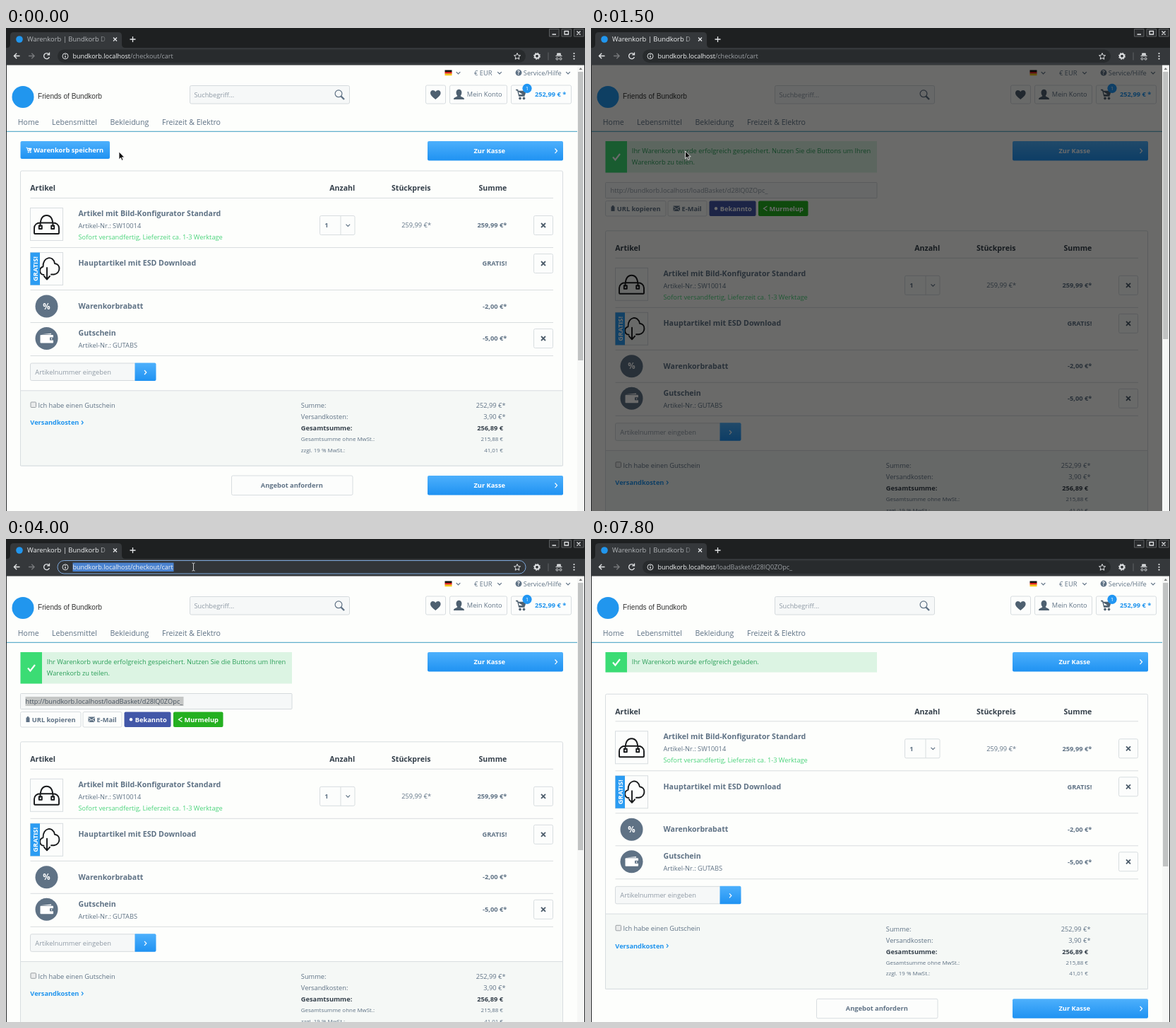
Animation, 820 px wide and 683 px high, one loop 7.9 s. Source, as an HTML page:

```html
<!DOCTYPE html>
<html lang="de">
<head>
<meta charset="utf-8">
<title>Warenkorb</title>
<style>
html, body { margin: 0; width: 100%; height: 100%; overflow: hidden; background: #1e2021; }
svg { display: block; width: 820px; height: 683px; }
text { font: 9.27px "Open Sans", sans-serif; fill: #5f7285; white-space: pre; }
.b { font-weight: 700; }
.big { font-size: 10.59px; }
.small { font-size: 7.95px; }
.dark { fill: #35404b; }
.w { fill: #fff; }
.blue { fill: #1f94ee; }
.ph { fill: #8f9aa5; }
.end { text-anchor: end; }
.mid { text-anchor: middle; }
.ok { fill: #2b9f59; }
.ui text { font-size: 9.03px; fill: #9fa3a7; }
.ui .w { fill: #f1f3f4; }
.ui .hit { font-size: 8.85px; font-weight: 700; }
.box { fill: #fcfdfc; stroke: #d8dde0; }
.field { fill: #f6f8f8; stroke: #d5dadd; }
.rule { stroke: #d9dddf; fill: none; }
.ln { fill: none; stroke: #5f7285; stroke-width: 1.2; }
.lt { fill: none; stroke: #e3e5e7; stroke-width: 1.3; }
.ink { fill: none; stroke: #17191b; stroke-width: 1.9; stroke-linejoin: round; stroke-linecap: round; }
.wl { fill: none; stroke: #fff; stroke-width: 1.2; }
</style>
</head>
<body>
<svg viewBox="0 0 820 683">
<defs>
  <linearGradient id="btn" x2="0" y2="1"><stop stop-color="#4db0fc"/><stop offset="1" stop-color="#1f92f2"/></linearGradient>
  <linearGradient id="fade"><stop stop-color="#35383b" stop-opacity="0"/><stop offset="1" stop-color="#35383b"/></linearGradient>
  <linearGradient id="shade" x2="0" y2="1"><stop stop-opacity=".4"/><stop offset="1" stop-opacity="0"/></linearGradient>
  <path id="chev" class="ln" d="M-2.8-1.4 0 1.4 2.8-1.4"/>
  <g id="del">
    <rect class="box" x="-13.5" y="-13.5" width="27" height="27" rx="2"/>
    <path d="M-3-3 3 3M3-3-3 3" stroke="#4a5a69" stroke-width="1.8"/>
  </g>
  <g id="pay">
    <rect width="192" height="27.5" rx="2" fill="url(#btn)"/>
    <text class="b w" x="65.5" y="17">Zur Kasse</text>
    <path class="wl" d="M180.5 10.5l3 3.3-3 3.3"/>
  </g>
  <g id="trolley">
    <path d="M0 0h2.6l2 8.6h8M3 2h11l-1.6 5.2H4.3z" stroke-width="1.3"/>
    <circle cx="6" cy="12" r="1.4"/><circle cx="11.5" cy="12" r="1.4"/>
  </g>
  <g id="globe">
    <circle r="4.3" fill="#b9bdc0"/>
    <path d="M-3.5-1.5 0-2.5 1 0-1 1 0 3M2-3 3.5 0" fill="none" stroke="#35383b"/>
  </g>
  <path id="tick" d="M-5 0-1.6 4 5-4.5" fill="none" stroke="#fff" stroke-width="2.1"/>
</defs>

<!-- shop page -->
<rect x="1" y="52" width="808" height="631" fill="#fdfefc"/>
<g id="head">
  <path fill="#111" d="M621.5 59.5h10v2.7h-10z"/><path fill="#d8201c" d="M621.5 62h10v2.7h-10z"/><path fill="#f5c518" d="M621.5 64.5h10v2.7h-10z"/>
  <use href="#chev" x="640.5" y="63.5"/><use href="#chev" x="699" y="63.5"/><use href="#chev" x="796" y="63.5"/>
  <text x="663" y="66.8">€ EUR</text>
  <circle cx="726" cy="63.2" r="4.4" fill="#5f7285"/><text class="small b w mid" x="726" y="66">?</text>
  <text x="732.8" y="66.8">Service/Hilfe</text>
  <circle cx="24" cy="97.5" r="15.5" fill="#2196ee"/>
  <text x="45" y="99.8" style="font:10.1px 'Liberation Sans',sans-serif;fill:#333">Friends of Bundkorb</text>
  <rect class="field" x="260.5" y="81.5" width="226" height="25.5" rx="2"/>
  <text class="ph" x="266.5" y="97.5">Suchbegriff...</text>
  <circle cx="471" cy="92.8" r="4.9" class="ln" stroke-width="1.8"/><path class="ln" d="M474.5 96.5l4.5 4.5" style="stroke-width:2.4"/>
  <rect class="box" x="594.5" y="81" width="28" height="26" rx="2"/>
  <path fill="#4e6070" d="M608.3 101c-3-2.6-7.3-5.5-7.3-9.3 0-4.6 5.6-5 7.3-1.4 1.7-3.6 7.3-3.2 7.3 1.4 0 3.800-4.300 6.700-7.300 9.300z"/>
  <rect class="box" x="628.5" y="81" width="81" height="26" rx="2"/>
  <path fill="#4e6070" d="M634 101c0-3.500 4-3 5.300-5-3-4-2-9.300 2.200-9.300s5.200 5.300 2.200 9.300c1.300 2 5.300 1.500 5.300 5z"/>
  <text x="652.8" y="97">Mein Konto</text>
  <rect class="box" x="715.5" y="81" width="85" height="26" rx="2"/>
  <use href="#trolley" x="722" y="87.500" fill="#4e6070" stroke="#4e6070"/>
  <circle cx="738" cy="85.300" r="6.600" fill="#2196f3"/><text class="small w mid" x="738" y="88.200">1</text>
  <text class="b blue" x="749" y="97">252,99 € *</text>
  <text class="big" x="16.800" y="137">Home</text>
  <text class="big" x="65" y="137">Lebensmittel</text>
  <text class="big" x="147.500" y="137">Bekleidung</text>
  <text class="big" x="221" y="137">Freizeit &amp; Elektro</text>
  <path d="M1 146.300h808" stroke="#62b0cc" stroke-width="1.200"/>
</g>

<use href="#pay" x="597" y="160"/>
<g id="save">
  <rect id="saveBg" x="20.500" y="160" width="126.500" height="25" rx="2" fill="url(#btn)"/>
  <use href="#trolley" transform="translate(28.500 169) scale(.55)" fill="#fff" stroke="#fff"/>
  <text class="b w" x="39" y="175.700">Warenkorb speichern</text>
</g>

<g id="saved">
  <path fill="#dcf4e3" d="M20.500 160H405v44.500H20.500z"/><path fill="#3bdc74" d="M20.500 160H51v44.500H20.500z"/>
  <use href="#tick" x="36" y="182.500"/>
  <text class="ok" x="57.800" y="177.300">Ihr Warenkorb wurde erfolgreich gespeichert. Nutzen Sie die Buttons um Ihren</text>
  <text class="ok" x="57.800" y="193.300">Warenkorb zu teilen.</text>
  <rect class="field" x="20.500" y="218.500" width="384.500" height="22" rx="1"/>
  <rect id="linkSel" x="27.500" y="223" width="224" height="13"/>
  <text id="link" x="27.500" y="232.800">http://bundkorb.localhost/loadBasket/d28lQ0ZOpc_</text>
  <g id="copy" fill="#5f7285">
    <rect id="copyBg" class="box" x="20.500" y="244.500" width="85.500" height="21.500" rx="2"/>
    <path d="M28.500 252.500h5v6.500h-5zM29.800 251h2.400v2h-2.400z"/>
    <text class="b" x="36.800" y="258.500" style="fill:inherit">URL kopieren</text>
  </g>
  <rect class="box" x="109" y="244.500" width="55" height="21.500" rx="2"/>
  <path fill="#5f7285" d="M116.500 251.500h9.500v7.500h-9.500z"/><path d="M116.500 252.500l4.700 3.500 4.800-3.500M116.500 259l3-3M126 259l-3-3" fill="none" stroke="#fff"/>
  <text class="b" x="128.500" y="258.500">E-Mail</text>
  <rect x="167.500" y="244.500" width="66" height="21.500" rx="2" fill="#4257a8"/>
  <circle cx="177" cy="255.300" r="2.200" fill="#fff"/>
  <text class="b w" x="182.800" y="258.500">Bekannto</text>
  <rect x="237" y="244.500" width="70.500" height="21.500" rx="2" fill="#24b020"/>
  <path class="wl" d="M249.500 252l-5 3.200 5 3.200"/>
  <text class="b w" x="252.500" y="258.500">Murmelup</text>
</g>

<g id="loaded">
  <path fill="#dcf4e3" d="M20.500 160H405v28.500H20.500z"/><path fill="#3bdc74" d="M20.500 160H51v28.500H20.500z"/>
  <use href="#tick" x="36" y="174.500"/>
  <text class="ok" x="57.800" y="177.300">Ihr Warenkorb wurde erfolgreich geladen.</text>
</g>

<g id="cart">
  <rect x="20.500" y="202" width="768" height="417" rx="2" fill="#fdfefc" stroke="#d8dde0"/>
  <path fill="#f5f8f6" stroke="#d8dde0" d="M20.500 512.800h768V619h-768z"/>
  <path class="rule" d="M34.500 240.500h740.500m-740.500 70h740.500m-740.500 60h740.500m-740.500 46h740.500m-740.500 47h740.500"/>
  <g class="head">
    <text class="big b dark" x="34.300" y="230.300">Artikel</text>
    <text class="big b dark" x="458.300" y="230.300">Anzahl</text>
    <text class="big b dark" x="546" y="230.300">Stückpreis</text>
    <text class="big b dark end" x="709.300" y="230.300">Summe</text>
  </g>
  <rect class="box" x="34.500" y="254.500" width="46" height="46"/>
  <path class="ink" d="M40 290v-7c0-5 4-7.500 8-7.500h19c4 0 8 2.500 8 7.500v7q0 1-1 1H41q-1 0-1-1zM48.500 280c0-10 3-15 9-15s9 5 9 15M46.800 279.500h4v4.500h-4zM64.200 279.500h4v4.500h-4z"/>
  <text class="big b" x="102.500" y="266.200">Artikel mit Bild-Konfigurator Standard</text>
  <text x="102.500" y="282.800">Artikel-Nr.: SW10014</text>
  <text x="102.500" y="298.800" style="fill:#4cd47c">Sofort versandfertig, Lieferzeit ca. 1-3 Werktage</text>
  <rect class="box" x="444.500" y="265.500" width="49.500" height="27" rx="2"/><path class="rule" d="M474 265.500v27"/>
  <text class="b" x="451.300" y="282.300">1</text><use href="#chev" x="484.300" y="279"/>
  <text class="end" x="602" y="282.300">259,99 €*</text>
  <text class="b end" x="709.300" y="282.300">259,99 €*</text>
  <use href="#del" x="761" y="279"/>

  <rect class="box" x="34.500" y="317.500" width="46" height="46"/>
  <path class="ink" d="M53.500 349c-7-1-7-10-1-11.500C52 323 67 321 69 333c9 1 8.500 14-1 15.500h-4M58 339v16m-4-4 4 4.500 4-4.500"/>
  <path fill="#2b9cf2" d="M34.500 317.500h13.500v46H34.500z"/>
  <text class="b w mid" transform="translate(45 340.500) rotate(-90)">GRATIS!</text>
  <text class="big b" x="102.500" y="336.300">Hauptartikel mit ESD Download</text>
  <text class="b end" x="709.300" y="336.300">GRATIS!</text>
  <use href="#del" x="761" y="333"/>

  <circle cx="57.500" cy="393.500" r="16" fill="#5f7285"/>
  <text class="b w mid" x="57.500" y="397.500" style="font-size:11.500px">%</text>
  <text class="big b" x="102.500" y="396.800">Warenkorbrabatt</text>
  <text class="b end" x="709.300" y="396.500">-2,00 €*</text>

  <circle cx="57.500" cy="439" r="16" fill="#5f7285"/>
  <rect x="48.500" y="434" width="18.500" height="11.500" rx="1" fill="#fff"/><path d="M50 433.300l14-1.500v1.500z" fill="#fff"/>
  <rect x="62" y="437.500" width="5.500" height="4" fill="#5f7285"/><circle cx="64.500" cy="439.500" r=".9" fill="#fff"/>
  <text class="big b" x="102.500" y="435">Gutschein</text>
  <text x="102.500" y="451.800">Artikel-Nr.: GUTABS</text>
  <text class="b end" x="709.300" y="442.300">-5,00 €*</text>
  <use href="#del" x="761" y="439"/>

  <rect class="field" x="34.500" y="474" width="149" height="24.500" rx="2"/>
  <text class="ph" x="41.300" y="490">Artikelnummer eingeben</text>
  <path fill="url(#btn)" d="M182.500 473.500h28q2 0 2 2v21.500q0 2-2 2h-28z"/><path class="wl" d="M196 484l2.800 3-2.800 3"/>

  <rect x="35" y="529" width="7.500" height="7.500" rx="1" fill="#e9ebeb" stroke="#9a9fa3"/>
  <text x="45.500" y="537">Ich habe einen Gutschein</text>
  <text class="b blue" x="34.300" y="561.300">Versandkosten</text><path class="ln" style="stroke:#1f94ee" d="M107 555.500l2.200 2.500-2.200 2.500"/>
  <text x="417.800" y="537.300">Summe:</text><text class="end" x="707.500" y="537.300">252,99 €*</text>
  <text x="417.800" y="553.300">Versandkosten:</text><text class="end" x="707.500" y="553.300">3,90 €*</text>
  <text class="b dark" x="417.800" y="569.300">Gesamtsumme:</text><text class="b dark end" x="704" y="569.300">256,89 €</text>
  <text class="small" x="417.800" y="584.300">Gesamtsumme ohne MwSt.:</text><text class="small end" x="704" y="584.300">215,88 €</text>
  <text class="small" x="417.800" y="600">zzgl. 19 % MwSt.:</text><text class="small end" x="704" y="600">41,01 €</text>

  <rect class="box" x="319.500" y="633" width="171.500" height="27.500" rx="2"/>
  <text class="b mid" x="404.800" y="650">Angebot anfordern</text>
  <use href="#pay" x="597" y="633"/>
</g>

<rect id="veil" x="1" y="52" width="808" height="631"/>
<g id="spin" fill="none" stroke="#fff">
  <circle cx="405" cy="383.500" r="8" opacity=".3"/><path d="M405 375.500a8 8 0 0 1 8 8"/>
</g>
<path fill="#f6f7f6" d="M809 52h10v631h-10z"/>
<path fill="#777" d="M811.500 59l2.300-3 2.300 3z"/>
<rect id="thumb" x="810" y="62" width="7.500" fill="#c1c3c3"/>

<!-- browser window -->
<g class="ui">
  <path fill="#1e2021" d="M0 0h820v28H0z"/>
  <path fill="#35383b" d="M0 28h820v24.500H0zM1 28q5 0 5-5V11q0-5 5-5h148q5 0 5 5v12q0 5 5 5z"/>
  <path stroke="#26282a" d="M.5 52v631M819.500 52v631"/>
  <circle id="icon" cx="19" cy="16" r="4.800" fill="#2196ee"/>
  <path id="load" class="lt" d="M19 11.500a4.500 4.500 0 1 1-4.500 4.500" style="stroke:#6ba5ee"/>
  <use id="noIcon" href="#globe" x="19" y="16"/>
  <text id="tab" x="30" y="19.300" style="font-size:9.400px">Warenkorb | Bundkorb D</text>
  <path fill="url(#fade)" d="M130 9h18v14h-18z"/>
  <path class="lt" d="M152 13.500l5 5m0-5-5 5M179.500 12v8m-4-4h8"/>
  <g fill="#2a2c2e" stroke="#5c5f61"><path d="M769.500 1.500h13.500v10.500h-13.500zM787 1.500h13.500v10.500H787zM804.500 1.500H818V12h-13.500z"/></g>
  <path class="lt" d="M773.500 9h5.500M791 4.500h5.500v4.500H791zM808.500 4.500l5 5m0-5-5 5"/>
  <path class="lt" d="M19.500 39.500h-8m3.700-3.800-3.800 3.800 3.800 3.800M60.700 37a4 4 0 1 0 .7 4M61.500 34.500v3.300h-3.300"/>
  <path class="lt" style="stroke:#77797c" d="M32 39.500h8m-3.700-3.800 3.800 3.800-3.800 3.800"/>
  <rect id="pill" x="73" y="30.500" width="663" height="18.500" rx="9.200"/>
  <g id="bar">
    <circle cx="84" cy="39.800" r="4" class="lt" style="stroke-width:1"/><path class="lt" d="M84 39v3M84 37v1"/>
    <rect id="sel" x="94.500" y="33.500" width="143" height="12.500" fill="#4a82cf"/>
    <text x="94.500" y="43"><tspan class="w">bundkorb.localhost</tspan><tspan id="path"></tspan></text>
    <path class="lt" style="stroke-width:1" d="M724 35.500l1.300 3 3.200.3-2.400 2.200.7 3.200-2.800-1.700-2.800 1.700.7-3.200-2.400-2.200 3.200-.3z"/>
  </g>
  <g id="empty">
    <circle class="lt" cx="83" cy="39" r="2.800"/><path class="lt" d="M85 41l3 3M95 34.500v11"/>
  </g>
  <g id="drop">
    <path fill="url(#shade)" d="M66 98h677v11H66z"/>
    <path fill="#33373a" d="M68.500 31q0-3 3-3h665.500q3 0 3 3v65q0 3-3 3H71.500q-3 0-3-3z"/>
    <path fill="#43474a" d="M68.500 52H740v23.500H68.500z"/>
    <use href="#globe" x="84" y="39.800"/><use href="#globe" x="84" y="63.500"/>
    <text x="102" y="43">http://<tspan class="w">bundkorb.localhost</tspan>/loadBasket/d28lQ0ZOpc_</text>
    <path class="lt" d="M320.500 34v11.500" style="stroke-width:1"/>
    <text class="hit" x="102" y="66.800" style="fill:#4a86d8">http://bundkorb.localhost/loadBasket/d28lQ0ZOpc_</text>
    <circle class="lt" cx="83.300" cy="86.500" r="2.600" style="stroke-width:1"/><path class="lt" d="M85.200 88.500l2.800 2.800"/>
    <text x="102" y="90.500"><tspan class="hit w">http://bundkorb.localhost/loadBasket/d28lQ0ZOpc_</tspan> - Sondel-Suche</text>
  </g>
  <circle cx="752" cy="39.800" r="3" fill="none" stroke="#e3e5e7" stroke-width="2"/><circle cx="752" cy="39.800" r="4.600" fill="none" stroke="#e3e5e7" stroke-dasharray="1.800"/>
  <path stroke="#606366" d="M768 34.500v11"/>
  <path fill="#e3e5e7" d="M780.500 35.500h5l.8 3h-6.600zM778.500 39h9v1h-9z"/><path class="lt" style="stroke-width:1" d="M779 43.500a1.500 1.500 0 1 0 3 0 1.500 1.500 0 1 0-3 0M784 43.500a1.500 1.500 0 1 0 3 0 1.500 1.500 0 1 0-3 0"/>
  <g fill="#e3e5e7"><circle cx="804.500" cy="36" r="1.100"/><circle cx="804.500" cy="39.800" r="1.100"/><circle cx="804.500" cy="43.600" r="1.100"/></g>
</g>

<path id="arrow" d="M0 0v10.800l2.500-2.300 1.600 3.800 1.900-.8-1.600-3.600h3.300z" fill="#111" stroke="#fff" stroke-width=".8"/>
<path id="hand" d="M-1 .5q1.200-1.300 2.200 0V4q3-.5 5.800 1.500v3.500q-.5 1.500-1 3H.3L-3.200 7q0-1.700 2.200-.5z" fill="#fff" stroke="#111" stroke-width="1"/>
<path id="beam" d="M-2-5.500Q0-5.500 0-4.500 0-5.500 2-5.500M0-4.500v9M-2 5.500Q0 5.500 0 4.500 0 5.500 2 5.500" fill="none" stroke="#c9cbcd"/>
</svg>
<script>
const LOOP = 7900, STEP = 100;
const $ = id => document.getElementById(id);
const show = (id, on) => { $(id).style.display = on ? '' : 'none'; };

// [time, x, y]
const pointer = [[400, 160, 175], [600, 133.5, 174], [1800, 133.5, 174], [2400, 87, 252],
  [2900, 87, 252], [3200, 198, 116], [3300, 198, 116], [3500, 240, 65], [3600, 240, 65],
  [3900, 265.5, 39.5], [6900, 265.5, 39.5], [7200, 330, 3]];
const dim = [[1000, 0], [1100, .28], [1300, .6], [1400, .68], [1500, .58], [1800, .06], [1900, 0]];

function at(keys, t) {
  const i = keys.findIndex(k => k[0] > t);
  if (i === 0) return keys[0].slice(1);
  if (i < 0) return keys[keys.length - 1].slice(1);
  const a = keys[i - 1], b = keys[i], p = (t - a[0]) / (b[0] - a[0]);
  return a.slice(1).map((v, n) => v + (b[n + 1] - v) * p);
}

function render(t) {
  const within = (a, b) => t >= a && t < b;
  const saved = within(1400, 6000), loaded = t >= 6000;

  show('save', t < 1400);
  show('saved', saved);
  show('loaded', loaded);
  $('saveBg').setAttribute('fill', t < 500 ? 'url(#btn)' : '#1f92f2');
  $('cart').setAttribute('transform', `translate(0 ${saved ? 84.8 : loaded ? 17.3 : 0})`);
  $('thumb').setAttribute('height', saved ? 378 : loaded ? 401 : 408);

  const hot = within(2300, 3000);
  $('copy').setAttribute('fill', hot ? '#1f94ee' : '#5f7285');
  $('copyBg').style.stroke = hot ? '#1f94ee' : '';
  show('linkSel', t >= 2600);
  $('linkSel').setAttribute('fill', t < 4000 ? '#3390f0' : '#c5c7c6');
  $('link').style.fill = t < 2600 ? '#8f9aa5' : t < 4000 ? '#fff' : '#46525d';

  $('veil').setAttribute('opacity', at(dim, t)[0]);
  show('spin', within(1100, 1400));
  $('spin').setAttribute('transform', `rotate(${(t - 1100) * .5} 405 383.5)`);

  $('tab').style.fill = within(800, 7800) ? '#f1f3f4' : '#b4b7ba';
  show('icon', !within(5600, 6600));
  show('load', within(5600, 6300));
  show('noIcon', within(6300, 6600));
  $('load').setAttribute('transform', `rotate(${(t - 5600) * .4} 19 16)`);

  const focus = within(4000, 5600);
  $('pill').setAttribute('fill', within(3800, 7100) ? '#323538' : '#282b2d');
  $('pill').setAttribute('stroke', focus ? '#7fa9dc' : 'none');
  show('bar', !within(4700, 5600));
  show('sel', within(4000, 4700));
  show('empty', within(4700, 5100));
  show('drop', within(5100, 5600));
  $('path').textContent = t < 5600 ? '/checkout/cart' : '/loadBasket/d28lQ0ZOpc_';
  $('path').style.fill = within(4000, 4700) ? '#f1f3f4' : '';

  const hand = within(500, 1400) || hot, beam = within(3800, 7100);
  const [x, y] = at(pointer, t);
  show('hand', hand);
  show('beam', beam);
  show('arrow', !hand && !beam && t < 7300);
  for (const id of ['hand', 'beam', 'arrow']) $(id).setAttribute('transform', `translate(${x} ${y})`);
}

function tick() {
  render(Math.floor(performance.now() % LOOP / STEP) * STEP);
  requestAnimationFrame(tick);
}
tick();
</script>
</body>
</html>
```
